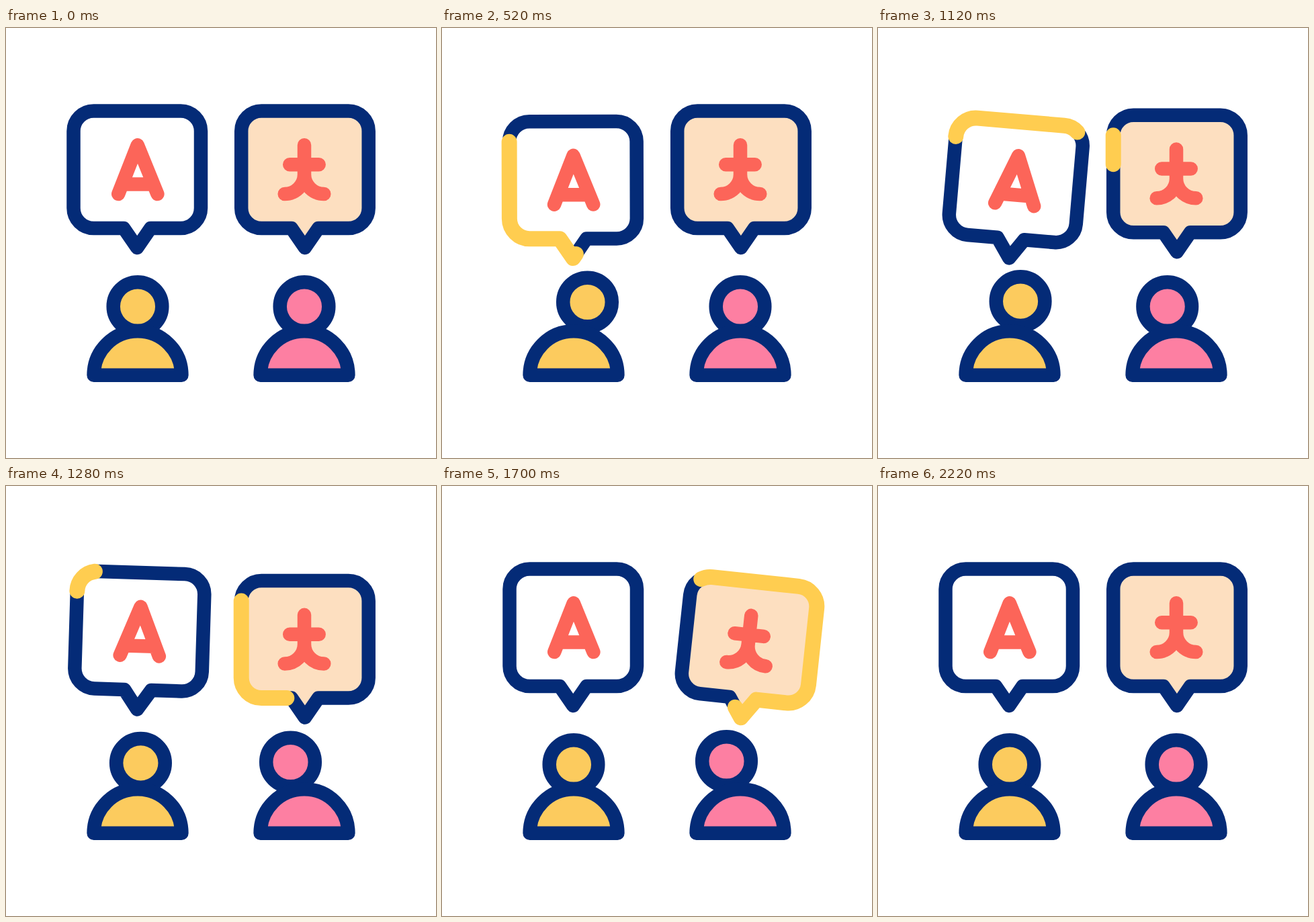
Animation, 640 px wide and 640 px high, one loop 2400 ms. Source, as an HTML page:

```html
<!DOCTYPE html>
<html lang="en">
<head>
<meta charset="utf-8">
<title>Conversation</title>
<style>
  html, body { margin: 0; width: 100%; height: 100%; overflow: hidden; background: #fff; }
  svg { display: block; width: 100vw; height: 100vh; }
  .line { stroke: #042b77; stroke-width: 20.5; }
  .trace { fill: none; stroke: #ffcd50; stroke-width: 23; }
  .glyph { fill: none; stroke: #fc6559; stroke-width: 20.5; }
</style>
</head>
<body>
<svg viewBox="0 0 640 640" stroke-linecap="round" stroke-linejoin="round">
  <defs>
    <path id="frame" d="M100.5 153.5V268a30 30 0 0 0 30 30H175.2L195.2 327L215.2 298H260a30 30 0 0 0 30 -30V153.5a30 30 0 0 0 -30 -30H130.5a30 30 0 0 0 -30 30Z"/>
    <path id="torso" d="M130.6 516.7a65.4 65.4 0 0 1 130.8 0Z"/>
  </defs>
</svg>
<script>
const LOOP = 2400, STEP = 20;
const NS = 'http://www.w3.org/2000/svg';
const svg = document.querySelector('svg');
const frame = document.getElementById('frame');
const outline = frame.getAttribute('d');
const total = frame.getTotalLength();
const TIP = '195.2 327';

// Tables of [time in ms, value], eased between neighbours.
const lean = [[200, 0], [400, 20.5], [1000, 20.5], [1400, 0]];
const nod = [[400, 0], [600, -10], [800, 0], [1000, -10], [1400, 0]];
const sink = [[200, 0], [500, 1], [1100, 1], [1400, 0]];
const tilt = [[500, 0], [800, -10], [1100, 5], [1400, 0]];
const traceEnd = [[200, 0], [1000, 1]];
const traceStart = [[600, 0], [1400, 1]];

function valueAt(keys, t) {
  if (t <= keys[0][0]) return keys[0][1];
  for (let i = 1; i < keys.length; i++) {
    const [t0, a] = keys[i - 1], [t1, b] = keys[i];
    if (t < t1) {
      const u = (t - t0) / (t1 - t0);
      return a + (b - a) * u * u * (3 - 2 * u);
    }
  }
  return keys[keys.length - 1][1];
}

function add(parent, tag, attrs) {
  const el = document.createElementNS(NS, tag);
  for (const name in attrs) el.setAttribute(name, attrs[name]);
  parent.appendChild(el);
  return el;
}

function makeSpeaker({ bodyX, bubbleX, skin, paper, glyph, side, drop, delay }) {
  const person = add(svg, 'g', { transform: `translate(${bodyX} 0)` });
  const head = add(person, 'circle', { class: 'line', cx: 196, cy: 414.5, r: 36.3, fill: skin });
  add(person, 'use', { class: 'line', href: '#torso', fill: skin });

  const place = add(svg, 'g', { transform: `translate(${bubbleX} 0)` });
  const bubble = add(place, 'g', {});
  add(bubble, 'use', { class: 'line', href: '#frame', fill: paper });
  const trace = add(bubble, 'path', { class: 'trace', d: outline });
  add(bubble, 'path', { class: 'glyph', d: glyph });

  return time => {
    const t = time - delay;
    head.setAttribute('transform', `translate(${side * valueAt(lean, t)} ${valueAt(nod, t)})`);
    bubble.setAttribute('transform',
      `translate(0 ${drop * valueAt(sink, t)}) rotate(${side * valueAt(tilt, t)} ${TIP})`);
    const from = valueAt(traceStart, t) * total;
    const length = valueAt(traceEnd, t) * total - from;
    trace.style.display = length > 0.01 ? '' : 'none';
    trace.setAttribute('stroke-dasharray', `${length} ${total * 2}`);
    trace.setAttribute('stroke-dashoffset', -from);
  };
}

const speakers = [
  makeSpeaker({
    bodyX: 0, bubbleX: 0, skin: '#fccb5e', paper: '#fff',
    glyph: 'M167.2 247L195.8 174.3L225.4 247M174 232.5H218',
    side: 1, drop: 15.6, delay: 0
  }),
  makeSpeaker({
    bodyX: 248, bubbleX: 249.7, skin: '#fd7fa2', paper: '#fddfc0',
    glyph: 'M194.3 174.3V218M172.5 203.2H216M165 247a29.3 29.3 0 0 0 29.3 -29.3a29.3 29.3 0 0 0 29.3 29.3',
    side: -1, drop: 17.8, delay: 800
  })
];

const begin = performance.now();
function draw() {
  const t = Math.floor((performance.now() - begin) % LOOP / STEP) * STEP;
  speakers.forEach(pose => pose(t));
  requestAnimationFrame(draw);
}
draw();
</script>
</body>
</html>
```
